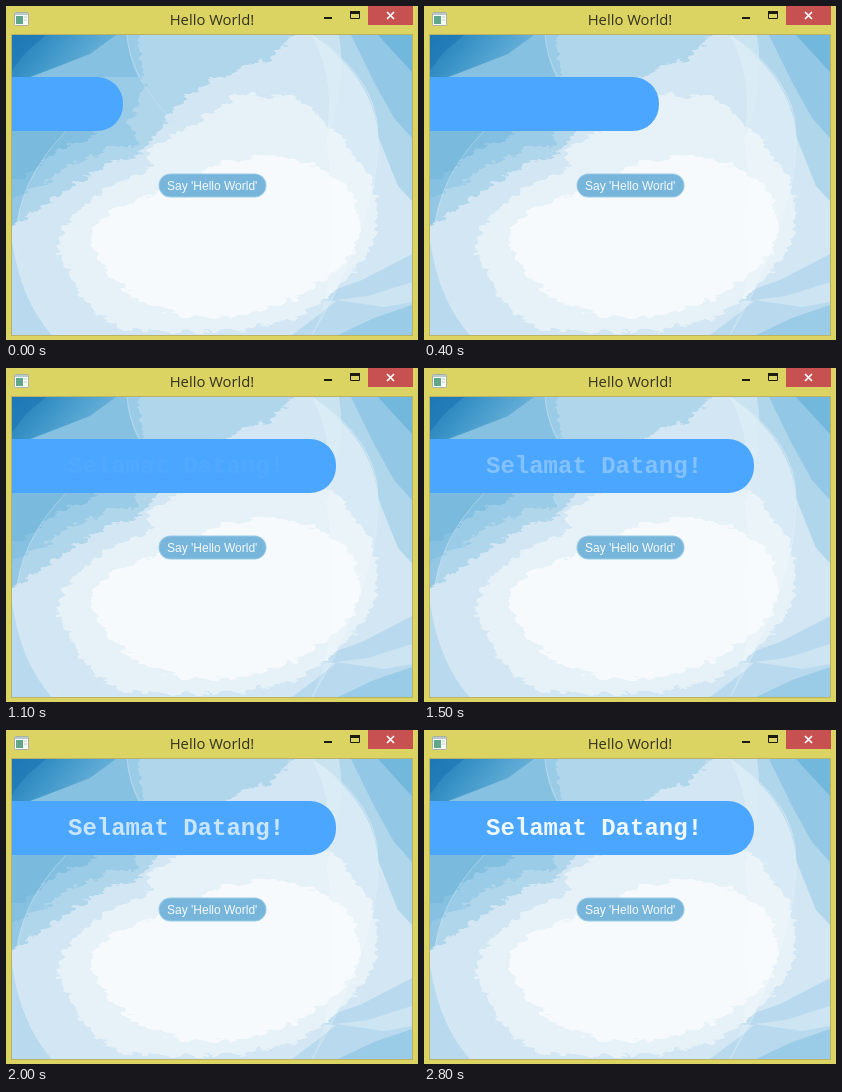
An HTML page that plays this animation: 412 px wide and 334 px high, repeating every 2.9 s.

```html
<!DOCTYPE html>
<html lang="en">
<head>
<meta charset="utf-8">
<title>Hello World!</title>
<style>
  html, body { margin: 0; width: 100%; height: 100%; overflow: hidden; background: #dbd362; }
  svg { display: block; width: 412px; height: 334px; }
  .title { font: 14.8px "Open Sans", sans-serif; fill: #35321f; }
  .label { font: 12px "Liberation Sans", Arial, sans-serif; fill: #f4fafe; }
  .greeting { font: bold 24px "Liberation Mono", "Courier New", monospace; fill: #eef8ff; }
</style>
</head>
<body>
<svg viewBox="0 0 412 334">
  <defs>
    <clipPath id="client"><rect x="6" y="29" width="400" height="300"/></clipPath>
    <filter id="rough" x="-5%" y="-5%" width="110%" height="110%">
      <feTurbulence type="fractalNoise" baseFrequency=".07 .16" numOctaves="3" seed="4"/>
      <feDisplacementMap in="SourceGraphic" scale="13" xChannelSelector="R" yChannelSelector="G"/>
    </filter>
    <linearGradient id="corner" x1="0" y1="0" x2="1" y2=".4">
      <stop offset="0" stop-color="#1d78b5"/>
      <stop offset=".45" stop-color="#3f97c9"/>
      <stop offset="1" stop-color="#72b7dc"/>
    </linearGradient>
  </defs>

  <rect width="412" height="334" fill="#dbd362"/>
  <rect x="5.5" y="28.5" width="401" height="301" fill="#d2e7f3" stroke="#b9b267"/>

  <g clip-path="url(#client)">
    <!-- right-hand rays -->
    <path d="M306 29H406V195L392 180L372 130Q368 72 306 29Z" fill="#b0d6ec"/>
    <path d="M345 29H406V132L388 112L368 76Z" fill="#92c8e5"/>
    <path d="M372 29H406V66Z" fill="#72b7dc"/>
    <path d="M406 248L356 274L316 288L280 292L330 295L314 308L286 329H406Z" fill="#b9daee"/>
    <path d="M406 276L362 290L330 294L378 301L406 296Z" fill="#cde4f2"/>
    <path d="M406 299L368 312L332 329H406Z" fill="#9bcce7"/>
    <path d="M6 235Q15 295 46 329H6Z" fill="#b9daee"/>

    <!-- rough tonal bands -->
    <g filter="url(#rough)">
      <path d="M-20 10H306L262 54L204 74L172 98L150 128L134 148L96 160L54 188L-20 238Z" fill="#b0d6ec"/>
      <path d="M-20 10H128L140 82L122 118L134 138L98 142L62 160L36 180L-20 204Z" fill="#9bcce7"/>
      <path d="M-20 110H70L92 128L54 142L30 164L-20 186Z" fill="#82bfe0"/>
      <path d="M52 240Q52 216 98 184L146 160L140 144L190 118L230 88L294 92L332 128L362 166Q384 222 354 258Q326 292 286 314Q190 334 112 321Q64 292 52 240Z" fill="#e7f2f8"/>
      <path d="M85 235Q82 216 126 196L184 177L206 159L262 148L314 162L345 184Q366 226 340 254Q314 286 254 306Q198 320 146 300Q98 276 85 235Z" fill="#f6fafd"/>
    </g>
    <path d="M6 125H60Q20 165 11 215L6 220Z" fill="#6fb4da" opacity=".45"/>

    <!-- top left corner -->
    <path d="M6 29H121Q123 54 132 71H6Z" fill="#86c1e1"/>
    <path d="M6 29H110L84 48L48 62L6 78Z" fill="url(#corner)"/>
    <path d="M6 29H40L20 46L6 64Z" fill="#1d78b5" opacity=".7"/>
    <path d="M121 29Q124 72 168 116" fill="none" stroke="#c6e1f0" opacity=".6"/>

    <!-- overlapping discs -->
    <path d="M306 29Q372 72 372 130C372 205 340 270 306 329Q338 260 320 132Q335 100 335 52Z" fill="#fff" opacity=".12"/>
    <path d="M306 29H333Q342 82 318 140Q332 78 306 29Z" fill="#e4f1f8" opacity=".5"/>
    <path d="M306 29Q372 72 372 130C372 205 340 270 306 329" fill="none" stroke="#e4f1f8" opacity=".5"/>
    <path d="M46 329Q10 285 10 230Q12 175 60 125" fill="none" stroke="#d8ebf5" opacity=".4"/>

    <!-- banner -->
    <rect id="bar" x="6" y="71" width="324" height="54" rx="26" fill="#4ba6ff"/>
    <rect id="tail" x="-40" y="71" width="60" height="54" fill="#4ba6ff"/>
    <text id="greeting" class="greeting" x="62" y="105" opacity="0">Selamat Datang!</text>

    <rect x="152.5" y="167.5" width="108" height="24" rx="12" fill="#9acbe6"/>
    <rect x="153.5" y="168.5" width="106" height="22" rx="11" fill="#77b5db"/>
    <text class="label" x="161" y="184">Say 'Hello World'</text>
  </g>

  <!-- window frame -->
  <rect x="8.5" y="6.5" width="14" height="13" rx="1" fill="#f7f9f4" stroke="#a9b0a4"/>
  <path d="M9 7H22V9H9Z" fill="#b7c9cd"/>
  <path d="M10 10H17V18H10Z" fill="#62a68a"/>
  <path d="M18 11H21M18 14H21" stroke="#c5ccc9"/>
  <text class="title" x="206" y="19" text-anchor="middle">Hello World!</text>
  <path d="M318 11H326V13H318Z" fill="#1c1b12"/>
  <path d="M344.5 6V12.5H353.5V6Z" fill="none" stroke="#1c1b12"/>
  <path d="M344 5H354V8H344Z" fill="#1c1b12"/>
  <rect x="362" width="45" height="19" fill="#c75050"/>
  <path d="M381 6L388 13M388 6L381 13" stroke="#fff" stroke-width="1.7"/>
</svg>
<script>
  const LOOP = 2900, STEP = 100, WIDTH = 324;
  const slide = { start: -514, length: 1374 };
  const fade = { start: 950, length: 1450 };
  const [bar, tail, greeting] = ["bar", "tail", "greeting"].map(id => document.getElementById(id));

  // Quadratic ramps over the first and last fifth, constant speed between.
  function easeBoth(u) {
    if (u <= 0) return 0;
    if (u >= 1) return 1;
    if (u < 0.2) return 3.125 * u * u;
    if (u > 0.8) return 1 - 3.125 * (1 - u) ** 2;
    return 1.25 * u - 0.125;
  }

  const progress = (t, { start, length }) => easeBoth((t - start) / length);

  function draw(now) {
    const t = Math.floor((now % LOOP) / STEP) * STEP;
    const right = 6 + WIDTH * progress(t, slide);
    bar.setAttribute("x", right - WIDTH);
    tail.setAttribute("width", Math.max(0, right + 40 - 27));
    greeting.setAttribute("opacity", progress(t, fade));
  }

  const origin = performance.now();
  function tick() {
    draw(performance.now() - origin);
    requestAnimationFrame(tick);
  }
  tick();
</script>
</body>
</html>
```
